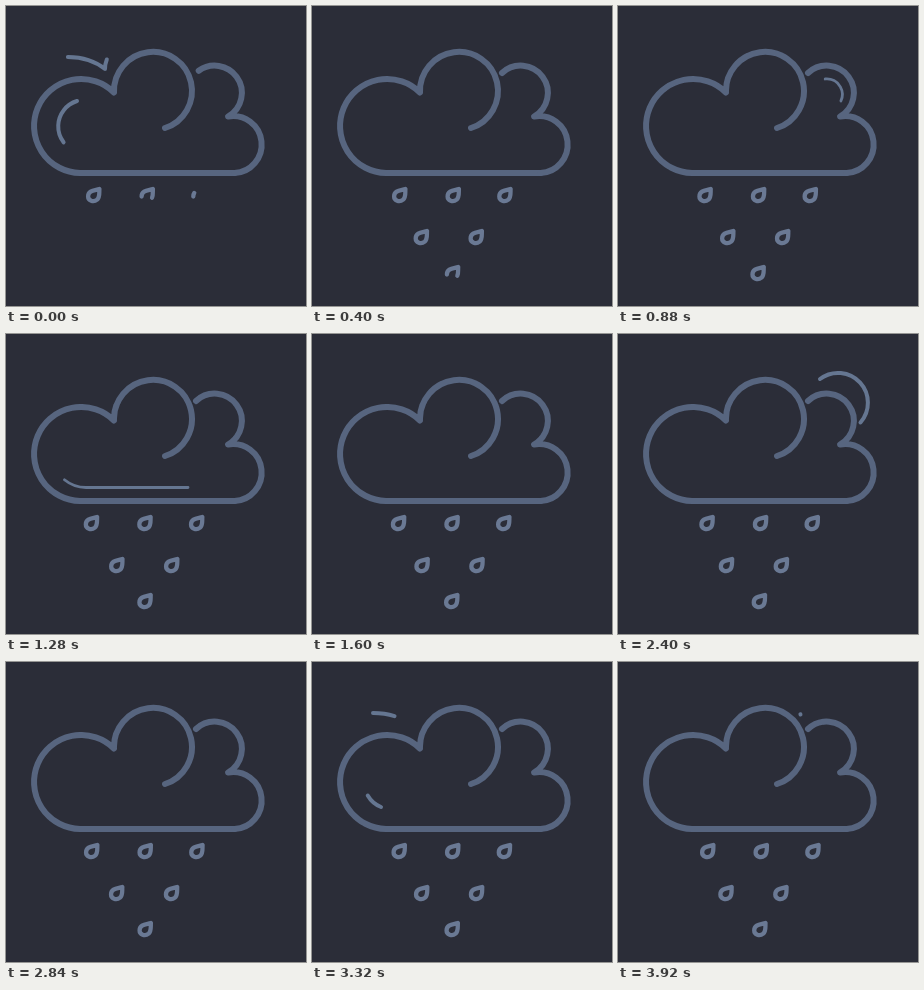
An HTML page that plays this animation: 300x300 px, repeating every 3960 ms.

```html
<!DOCTYPE html>
<html lang="en">
<head>
<meta charset="utf-8">
<title>Rain cloud</title>
<style>
html, body { margin: 0; width: 100%; height: 100%; overflow: hidden; background: #2b2d38; }
svg { display: block; width: 300px; height: 300px; }
path { fill: none; stroke-linecap: round; stroke-linejoin: round; }
.cloud { stroke: #57657f; stroke-width: 6; }
.accent { stroke: #657691; stroke-width: 4; }
.thin { stroke-width: 2.8; }
.drop { stroke: #6a7994; stroke-width: 4.3; }
</style>
</head>
<body>
<svg id="stage" viewBox="0 0 300 300">
  <path class="cloud" d="M228.5 167H74A47 47 0 1 1 108 86.5A39 39 0 1 1 159 122"/>
  <path class="cloud" id="sideCloud" pathLength="1" d="M228.5 167A28.5 28.5 0 1 0 222 110.5A27.2 27.2 0 1 0 190 67"/>
  <path class="accent" id="innerLeft" pathLength="1" d="M71 95A26.5 26.5 0 0 0 69 145"/>
  <path class="accent" id="outerLeft" pathLength="1" d="M102.5 50Q99 56 99 63Q84 51 61 51"/>
  <path class="accent thin" id="innerRight" pathLength="1" d="M207 73A15.5 15.5 0 0 1 221 98"/>
  <path class="accent thin" id="innerBase" pathLength="1" d="M182 153.5H80A34 34 0 0 1 46 120"/>
  <path class="accent" id="outerRight" pathLength="1" d="M266 139A28.5 28.5 0 0 0 242 89A29.85 29.85 0 0 0 202 45"/>
  <path class="accent" id="outerTop" pathLength="1" d="M114 52A35.6 35.6 0 0 1 182.5 52.5"/>
</svg>
<script>
const LOOP = 3960;
const DRAW = 240, HOLD = 180;
const stage = document.getElementById('stage');
const byId = id => document.getElementById(id);
const clamp = v => Math.min(1, Math.max(0, v));
const ease = v => (1 - Math.cos(Math.PI * clamp(v))) / 2;

// Each accent is traced, then erased from its tail.
const accents = [
  ['innerLeft', [-164, 2985]],
  ['outerLeft', [-220, 3006]],
  ['innerRight', [690]],
  ['innerBase', [1110]],
  ['outerRight', [2106]],
  ['outerTop', [3510]]
].map(([id, starts]) => ({ path: byId(id), starts }));

// x, y and sway reach
const drops = [
  [88.1, 189, 2.3], [141.6, 189, 2.3], [193.3, 189, 2.3],
  [109.7, 231, -1.5], [164.6, 231, -1.5], [140.9, 267, 1.5]
].map(([x, y, reach]) => {
  const path = byId('innerLeft').cloneNode();
  path.removeAttribute('id');
  path.setAttribute('class', 'drop');
  path.setAttribute('d', 'M-6 1.5C-6 -5 1 -4.5 5.3 -6C5 -2.5 6 2 3 4.7C-.8 7.8 -6 5.5 -6 1.5Z');
  stage.append(path);
  return { path, x, y, reach };
});

function trim(path, tail, head) {
  const length = head - tail;
  path.style.display = length > 0 ? '' : 'none';
  path.style.strokeDasharray = `${length} 3`;
  path.style.strokeDashoffset = -tail;
}

function sway(t) {
  if (t < 780) return 0;
  if (t < 1330) return -Math.sin((t - 780) / 550 * Math.PI / 2);
  return -Math.cos((t - 1330) / 1640 * Math.PI * 2);
}

function render(t) {
  trim(byId('sideCloud'), 0, Math.min(1, 0.98 + t / 4000));
  for (const { path, starts } of accents) {
    const age = t - starts.filter(s => s <= t).pop();
    if (age >= 0) trim(path, ease((age - HOLD) / DRAW), ease(age / DRAW));
    else trim(path, 0, 0);
  }
  const shift = sway(t);
  drops.forEach(({ path, x, y, reach }, i) => {
    trim(path, 0, ease((t + 250 - i * 100) / 260));
    path.setAttribute('transform', `translate(${x + reach * shift} ${y})`);
  });
}

const began = performance.now();
function tick() {
  render((performance.now() - began) % LOOP);
  requestAnimationFrame(tick);
}
render(0);
requestAnimationFrame(tick);
</script>
</body>
</html>
```
